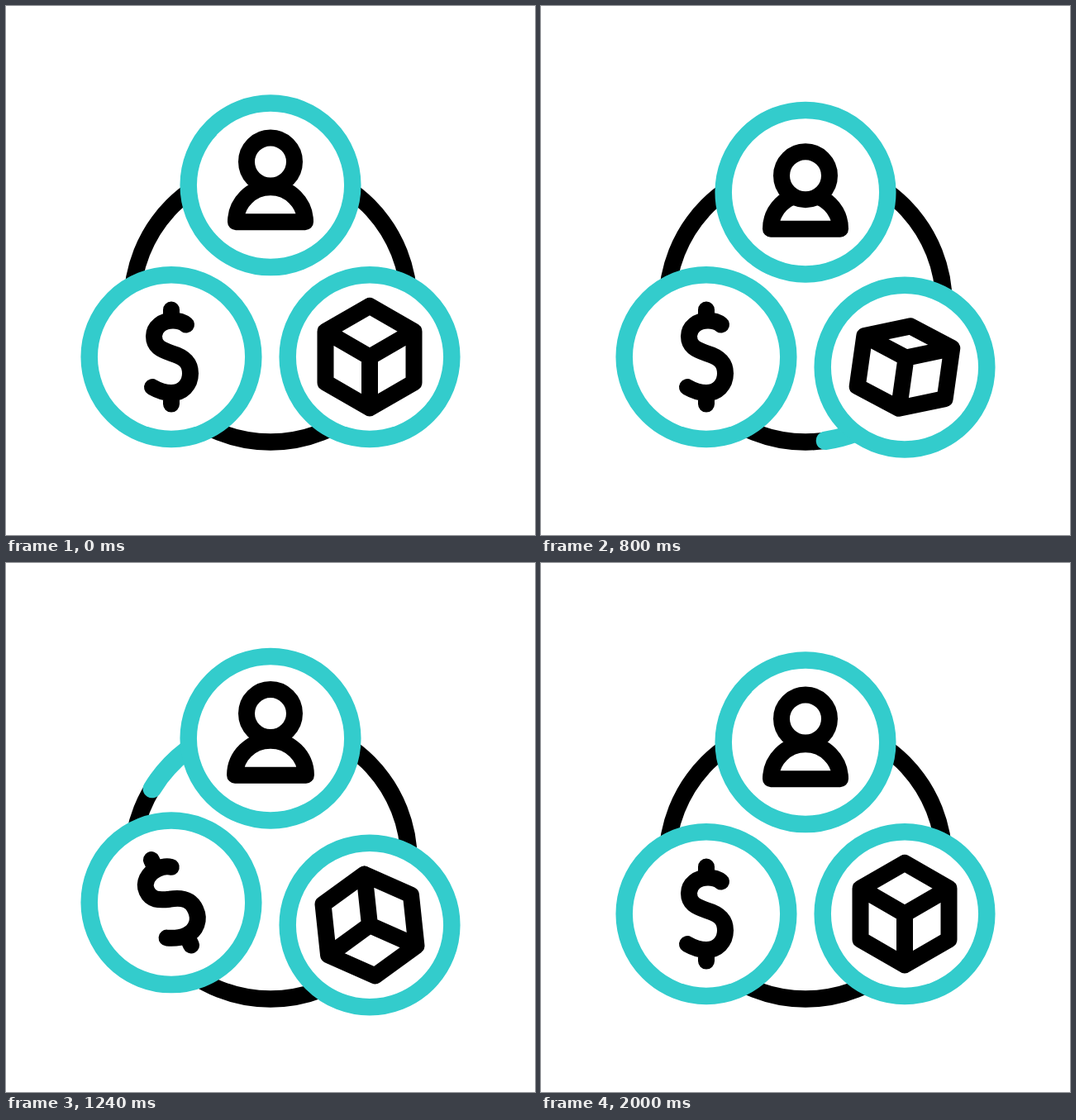
Recreate the animation shown at these times as an HTML page. Size 640 px wide and 640 px high, loop 2.4 s.

```html
<!DOCTYPE html>
<html lang="en">
<head>
<meta charset="utf-8">
<title>Trade cycle</title>
<style>
  html, body { margin: 0; width: 100%; height: 100%; overflow: hidden; background: #fff; }
  svg { display: block; width: 100vw; height: 100vh; }
  svg * { stroke-width: 20; stroke-linecap: round; stroke-linejoin: round; }
  .ink { fill: none; stroke: #000; }
  .solid { fill: #fff; stroke: #000; }
  .ring { fill: #fff; stroke: #3cc; stroke-width: 20.5; }
  #track { stroke-width: 20.5; }
  #arc { fill: none; stroke: #3cc; stroke-width: 22.5; }
</style>
</head>
<body>
<svg viewBox="0 0 640 640">
  <circle class="ink" id="track" cx="320" cy="360" r="167.5"/>
  <path id="arc"/>
  <g id="buyer">
    <circle class="ring" r="99.3"/>
    <path class="ink" id="body"/>
    <circle class="solid" id="head" r="29"/>
  </g>
  <g id="money">
    <circle class="ring" r="99.3"/>
    <path class="ink" id="dollar" d="M0-57V-44M0 44V57M18-39C13-43 8-44 2-44C-11-44-21-36-21-25C-21-13-13-9 0-4.5C16 0 23 7 23 20C23 34 13 43.5 0 43.5C-9 43.5-16 40.5-23 36.5"/>
  </g>
  <g id="goods">
    <circle class="ring" r="99.3"/>
    <path class="ink" id="cube"/>
  </g>
</svg>
<script>
const LOOP = 2400;
const SETTLE = 1190;
const SWINGS = [0, 12.5, -15, 18, -7.5, 0];

// beat: time of each of the first three swings; turn: time of the fourth.
const badges = {
  buyer: { x: 320, y: 216.8, start: 300, beat: 190, turn: 185 },
  goods: { x: 440, y: 424.6, start: 615, beat: 190, turn: 200 },
  money: { x: 200, y: 424.6, start: 806, beat: 205, turn: 360 }
};

const $ = id => document.getElementById(id);
const set = (id, name, value) => $(id).setAttribute(name, value);
const span = (t, from, to) => Math.min(1, Math.max(0, (t - from) / (to - from)));
const hump = (t, from, to) => Math.sin(Math.PI * span(t, from, to));
const ease = u => (1 - Math.cos(Math.PI * u)) / 2;

// Vertical offset of a badge: eased swings that die away.
function bounce({ start, beat, turn }, t) {
  const times = [0, beat, 2 * beat, 3 * beat, 3 * beat + turn, SETTLE];
  let y = 0;
  for (let i = 1; i < times.length; i++) {
    y += (SWINGS[i] - SWINGS[i - 1]) * ease(span(t - start, times[i - 1], times[i]));
  }
  return y;
}

// Point on the large circle, as a share of a turn clockwise from the top.
function orbit(turn) {
  const a = turn * 2 * Math.PI;
  return `${320 + 167.5 * Math.sin(a)} ${360 - 167.5 * Math.cos(a)}`;
}

// The head runs evenly; the tail starts slowly and catches up.
function arcPath(t) {
  const head = span(t, 300, 1350), tail = head ** 1.625;
  if (head - tail < 0.001) return "";
  return `M${orbit(tail)}A167.5 167.5 0 0 1 ${orbit(head)}`;
}

// Tilt 1 shows the lid, 0 only the sides, -1 the underside.
function cubePath(tilt) {
  const w = 53.5, h = 30.9, d = h * tilt;
  const y = tilt > 0 ? -h : h;
  return `M${-w} ${-h}L0 ${d - h}L${w} ${-h}V${h}L0 ${h + d}L${-w} ${h}Z` +
    `M0 ${d - h}V${h + d}M${-w} ${y}L0 ${y - d}L${w} ${y}`;
}

function draw(t) {
  for (const id in badges) {
    const { x, y } = badges[id];
    set(id, "transform", `translate(${x} ${y + bounce(badges[id], t)})`);
  }

  // The person ducks as the badge drops and spreads a little as it rises.
  const drop = bounce(badges.buyer, t);
  const r = 42 + 0.2 * Math.max(0, -drop);
  set("head", "cy", -28.3 + drop * (drop > 0 ? 1 : 0.4));
  set("body", "d", `M${-r} 44.5A${r} 42 0 0 1 ${r} 44.5Z`);

  set("dollar", "transform", `rotate(${-29.6 * hump(t, 940, 1880)})`);

  const spin = 12 * hump(t, 680, 1200) - 36 * hump(t, 1200, 1960);
  set("cube", "transform", `rotate(${spin})`);
  set("cube", "d", cubePath(Math.cos(2 * Math.PI * span(t, 630, 1830))));

  set("arc", "d", arcPath(t));
}

const start = performance.now();
function tick() {
  draw((performance.now() - start) % LOOP);
  requestAnimationFrame(tick);
}
draw(0);
requestAnimationFrame(tick);
</script>
</body>
</html>
```
